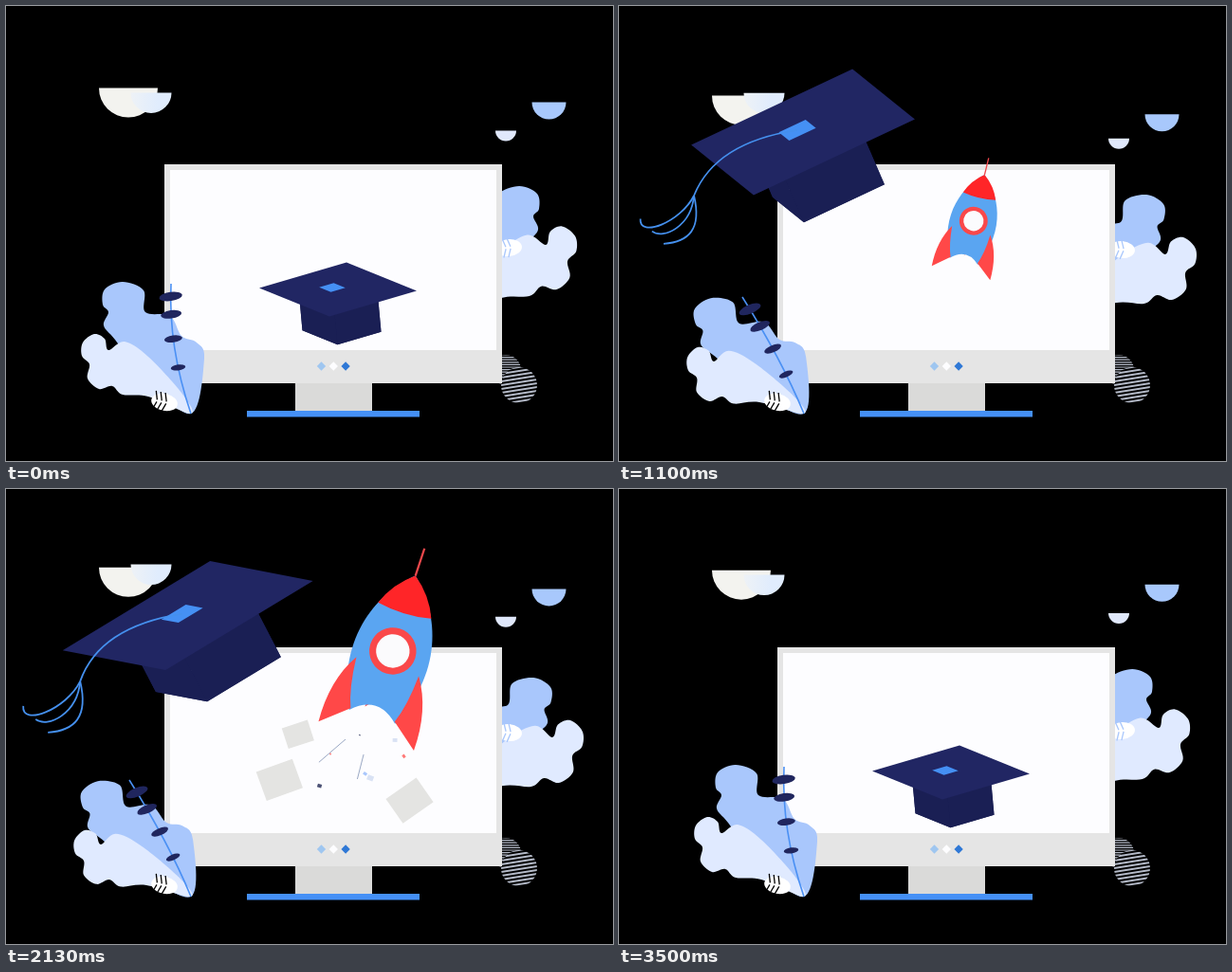
An HTML page with a canvas for the animation above (3570 ms loop, 640 px wide and 480 px high).

```html
<!DOCTYPE html>
<html lang="en">
<head>
<meta charset="utf-8">
<title>Graduation launch</title>
<style>
html, body { margin: 0; width: 640px; height: 480px; overflow: hidden; background: #000; }
canvas { display: block; }
</style>
</head>
<body>
<canvas id="stage" width="640" height="480"></canvas>
<script>
const ctx = document.getElementById('stage').getContext('2d');
const LOOP = 3570, STEP = LOOP / 52, TAU = Math.PI * 2;
let t = 0;

const mix = (a, b, k) => a + (b - a) * k;
function ramp(from, to) {
  const u = Math.min(1, Math.max(0, (t - from) / (to - from)));
  return u * u * (3 - 2 * u);
}
const during = (start, full, leave, end) => ramp(start, full) - ramp(leave, end);
const wave = (peak, period = LOOP) => Math.cos((t - peak) / period * TAU);

// Smooth cyclic motion through [time, pose] keys, without overshoot.
function travel(keys) {
  const n = keys.length;
  const time = i => keys[(i + n) % n][0] + LOOP * Math.floor(i / n);
  let i = n - 1;
  while (t < keys[i][0]) i--;
  const h = time(i + 1) - time(i), u = (t - time(i)) / h, w = 1 - u;
  return keys[0][1].map((_, k) => {
    const val = j => keys[(j + n) % n][1][k];
    const rate = j => (val(j + 1) - val(j)) / (time(j + 1) - time(j));
    const slope = j => {
      const a = rate(j - 1), b = rate(j);
      return a * b > 0 ? 2 * a * b / (a + b) : 0;
    };
    return val(i) * (1 + 2 * u) * w * w + val(i + 1) * (3 - 2 * u) * u * u
      + h * u * w * (slope(i) * w - slope(i + 1) * u);
  });
}
function randomizer(seed) {
  return () => (seed = seed * 16807 % 2147483647) / 2147483647;
}

function fill(color) { ctx.fillStyle = color; ctx.fill(); }
function stroke(color, width) { ctx.strokeStyle = color; ctx.lineWidth = width; ctx.stroke(); }
function rect(color, x, y, w, h) { ctx.fillStyle = color; ctx.fillRect(x, y, w, h); }
function poly(color, points) {
  ctx.beginPath();
  points.forEach(p => ctx.lineTo(...p));
  ctx.closePath();
  fill(color);
}
function blob(color, p) {
  const n = p.length, at = i => p[(i + n) % n];
  ctx.beginPath();
  ctx.moveTo(p[0], p[1]);
  for (let i = 0; i < n; i += 2) {
    const out = k => at(i + k) + (at(i + 2 + k) - at(i - 2 + k)) / 6;
    const back = k => at(i + 2 + k) - (at(i + 4 + k) - at(i + k)) / 6;
    ctx.bezierCurveTo(out(0), out(1), back(0), back(1), at(i + 2), at(i + 3));
  }
  fill(color);
}
function disc(color, x, y, r, end = TAU) {
  ctx.beginPath();
  ctx.arc(x, y, r, 0, end);
  fill(color);
}
function oval(color, rx, ry) {
  ctx.beginPath();
  ctx.ellipse(0, 0, rx, ry, 0, 0, TAU);
  fill(color);
}
function line(color, width, x0, y0, x1, y1) {
  ctx.beginPath();
  ctx.moveTo(x0, y0);
  ctx.lineTo(x1, y1);
  stroke(color, width);
}
function placed(x, y, degrees, draw, sx = 1, sy = sx) {
  ctx.save();
  ctx.translate(x, y);
  ctx.scale(sx, sy);
  ctx.rotate(degrees * Math.PI / 180);
  draw();
  ctx.restore();
}

function clouds() {
  const cloud = (color, x, r, y, amp, peak) => disc(color, x, y + amp * wave(peak), r, Math.PI);
  const glow = ctx.createLinearGradient(131, 0, 160, 0);
  glow.addColorStop(0, '#eef2f6');
  glow.addColorStop(1, '#e0ecfd');
  cloud('#f3f3ef', 129, 31, 87, 8, 920);
  cloud(glow, 153, 21.5, 87, 8, 560);
  cloud('#a8c8fc', 572.5, 18, 106, 8.5, 1200);
  cloud('#e0e8fb', 527, 11, 134.7, 5.3, 1250);
}

// Both plants share these outlines, drawn outward from the root.
const LEAF = [0, 0, -14, -58, -6, -75, 10, -82, 22, -103, 48, -107, 50, -130,
  72, -139, 91, -131, 93, -115, 87, -107, 92, -93, 80, -78, 50, -40];
const FROND = [0, 0, 10, -22, 45, -60, 70, -76, 87, -67, 91, -79, 102, -84, 114, -75,
  115, -61, 107, -52, 109, -37, 97, -26, 83, -29, 72, -20, 45, -18];

function fern(x, y, angle, gap) {
  placed(x, y, angle, () => {
    oval('#fff', 14, 9);
    for (let i = -8; i <= 6; i += 5) {
      line(gap, 1.3, i, 1, i - 3, 10);
      line(gap, 1.3, i, -1, i - 3, -10);
    }
  });
}

function rightPlant() {
  const gust = during(420, 760, 2470, 3020);
  placed(469, 329, gust * 6.5, () => blob('#a9c7fc', LEAF));
  placed(469, 329, gust * 5.5, () => blob('#e0eaff', FROND), 1.15);
  fern(530, 255 + gust * 2, gust * 10 - 5, '#a9c7fc');
}

function leftPlant() {
  const rise = ramp(420, 760);
  placed(195, 430, 11.5 * (rise - ramp(2470, 3500)), () => blob('#a9c7fc', LEAF), -1, 1);
  placed(195, 430, 7.5 * (rise - ramp(2100, 3450)), () => blob('#e0eaff', FROND), -1, 1);
  fern(167, 418, 12, '#000');

  const bend = rise - ramp(2470, 3250);
  const control = [171, mix(360, 372, bend)];
  const tip = [mix(174, 130, bend), mix(293, 307, bend)];
  ctx.beginPath();
  ctx.moveTo(195, 430);
  ctx.quadraticCurveTo(...control, ...tip);
  stroke('#4a90f4', 1.6);
  for (const u of [.35, .57, .76, .9]) {
    const on = (root, k) => mix(mix(root, control[k], u), mix(control[k], tip[k], u), u);
    placed(on(195, 0), on(430, 1), -8 - 15 * bend, () => oval('#20265e', 5 + 8 * u, 2 + 3 * u));
  }
}

function stripedBall(x, y, r, gap, tilt) {
  ctx.save();
  ctx.beginPath();
  ctx.arc(x, y, r, 0, TAU);
  fill('#000');
  ctx.clip();
  for (let d = -r; d < r; d += gap) line('#b4bac8', gap * .45, x - r, y + d + tilt, x + r, y + d - tilt);
  ctx.restore();
}

function monitor() {
  rect('#dadad9', 305, 398, 81, 29);
  rect('#4590f6', 254, 427, 182, 6.5);
  rect('#e5e5e5', 167, 167, 356, 231);
  rect('#fdfdff', 173, 173, 344, 190);
  ['#9fc6f0', '#fdfdff', '#2f78d6'].forEach((color, i) =>
    placed(332.5 + i * 12.8, 380, 45, () => rect(color, -3.3, -3.3, 6.6, 6.6)));
}

// A chip bursts from the nozzle, drifts down and grows.
function chip(color, birth, vx, vy, scale, life, angle) {
  const age = t - birth;
  if (age <= 0) return;
  const burst = 1 - Math.exp(-age / 180);
  const size = (28 * burst + .013 * age) * scale * (1 - ramp(birth + life, birth + life + 200));
  placed(366 + vx * burst, 250 + vy * burst + .05 * age, angle,
    () => rect(color, -size / 2, -size * .4, size, size * .8));
}
function confetti(spin) {
  const paper = '#e4e4e2';
  chip(paper, 1150, -78, 8, 1, 1400, -20);
  chip(paper, 1250, 60, 35, 1, 1300, -35);
  chip(paper, 1780, -68, -10, 1, 800, -18);
  chip(paper, 1170, -26, 75, 1.1, 280, -40);
  const random = randomizer(11), colors = ['#ff7a78', '#d9e2f4', '#4c5275', '#a9c7fc'];
  for (let i = 0; i < 14; i++) {
    chip(colors[i % 4], 1350 + i * 75, mix(-110, 110, random()), mix(0, 70, random()),
      mix(.16, .38, random()), 350, random() * 90);
  }
  ctx.globalAlpha = during(1150, 1350, 2450, 2700);
  line('#9aa8c4', 1, 358, 264, 332 + 12 * spin, 290 + 10 * spin);
  line('#9aa8c4', 1, 375 - 12 * spin, 280, 368 - 14 * spin, 306);
  ctx.globalAlpha = 1;
}

// x, y and size of the rocket.
const FLIGHT = [
  [0, [352, 300, 0]],
  [760, [361, 263, .43]],
  [1370, [387, 200, .74]],
  [1850, [408, 181, .93]],
  [2200, [407, 170, 1.02]],
  [2470, [402, 171, 1.03]],
  [2650, [400, 176, 1]],
  [3020, [358, 267, .5]],
  [3500, [352, 300, 0]]
];
function rocket(spin) {
  const [x, y, size] = travel(FLIGHT);
  if (size < .02) return;
  const turn = spin * Math.min(1, Math.max(0, size * 3 - 1.3));
  placed(x, y, 5 + 12.5 * during(760, 1300, 2600, 3050) + 2.5 * turn, () => {
    poly('#ff4848', [[turn * 30, 20], [turn * 52, 40], [turn * 59, 64], [turn * 38, 60]]);
    line('#f0484c', 2.2, 0, -82, -4 * turn, -112);
    ctx.beginPath();
    ctx.moveTo(0, -82);
    ctx.bezierCurveTo(30, -56, 60, 0, 25, 72);
    ctx.quadraticCurveTo(0, 48, -25, 72);
    ctx.bezierCurveTo(-60, 0, -30, -56, 0, -82);
    fill('#5aa5f1');
    ctx.beginPath();
    ctx.moveTo(0, -82);
    ctx.quadraticCurveTo(20, -67, 29, -44);
    ctx.quadraticCurveTo(0, -38, -29, -44);
    ctx.quadraticCurveTo(-20, -67, 0, -82);
    fill('#ff2528');
    for (const side of [-1, 1]) {
      ctx.beginPath();
      ctx.moveTo(side * 34, 17);
      ctx.quadraticCurveTo(side * 54, 48, side * 52, 93);
      ctx.lineTo(side * 24, 70);
      ctx.quadraticCurveTo(side * 32, 50, side * 34, 17);
      fill('#ff4848');
    }
    disc('#fa484a', -3 * turn, 0, 24.5);
    disc('#fbfbfd', -3 * turn, 0, 17.5);
  }, size);
}

// Cap poses: center, two board edges, depth of the skullcap, cord knot.
const REST = [350, 299, 92, -27, 74, 30, 4, 44, 346, 297];
const TURN = [298, 243, 129, -5, -6, 55, 7, 49, 252, 224];
const RISE = [252, 193, 152, -41, 33, 56, 10, 56, 165, 185];
const TILT = [194, 133, 170, -80, 66, 53, 27, 62, 79, 200];
const GLIDE = [190, 134, 124, -116, 146, -22, 36, 62, 74, 200];
const HOVER = [190, 134, 139, -108, 142, -9, 36, 62, 77, 205];
const CAP_PATH = [[0, REST], [500, TURN], [760, RISE], [1100, TILT], [1370, GLIDE],
  [1850, HOVER], [2470, TILT], [2680, TILT], [3020, TURN], [3500, REST]];

function cap() {
  const [cx, cy, ux, uy, vx, vy, nx, ny, kx, ky] = travel(CAP_PATH);
  const square = (x, y, k) => [[-k, -k], [k, -k], [k, k], [-k, k]]
    .map(([a, b]) => [x + a * ux + b * vx, y + a * uy + b * vy]);
  const top = square(cx, cy, .25), rim = square(cx + nx, cy + ny, .25);
  const button = [cx - 6, cy - 2];
  poly('#1a1f54', rim);
  rim.forEach((p, i) => poly('#1a1f54', [p, rim[(i + 1) % 4], top[(i + 1) % 4], top[i]]));
  poly('#212663', square(cx, cy, .5));
  poly('#4590f4', square(...button, .083));

  const loose = during(800, 1150, 2650, 2950);
  const reach = Math.hypot(kx - button[0], ky - button[1]) / 130;
  const color = '#4590ee', width = 1.1 + .7 * loose;
  ctx.beginPath();
  ctx.moveTo(...button);
  ctx.quadraticCurveTo((button[0] + kx) / 2 - 34 * loose * reach, (button[1] + ky) / 2 - 22 * reach, kx, ky);
  stroke(color, width);
  if (loose < .02) return;
  for (let i = 0; i < 3; i++) {
    const at = (x, y) => [kx + x * loose, ky + y * loose];
    ctx.beginPath();
    ctx.moveTo(kx, ky);
    ctx.bezierCurveTo(...at(-15 + 12 * i, 30 + 4 * i), ...at(-62 + 28 * i, 48 + 2 * i), ...at(-60 + 13 * i, 26 + 14 * i));
    stroke(color, width);
  }
}

function frame(now) {
  t = Math.floor((now % LOOP + 12) / STEP) * STEP % LOOP;
  const spin = wave(1370, 1050);
  rect('#000', 0, 0, 640, 480);
  clouds();
  rightPlant();
  stripedBall(527, 384, 16, 2.6, 0);
  stripedBall(541, 400, 19, 4, 3);
  monitor();
  confetti(spin);
  rocket(spin);
  cap();
  leftPlant();
  requestAnimationFrame(frame);
}
requestAnimationFrame(frame);
</script>
</body>
</html>
```
